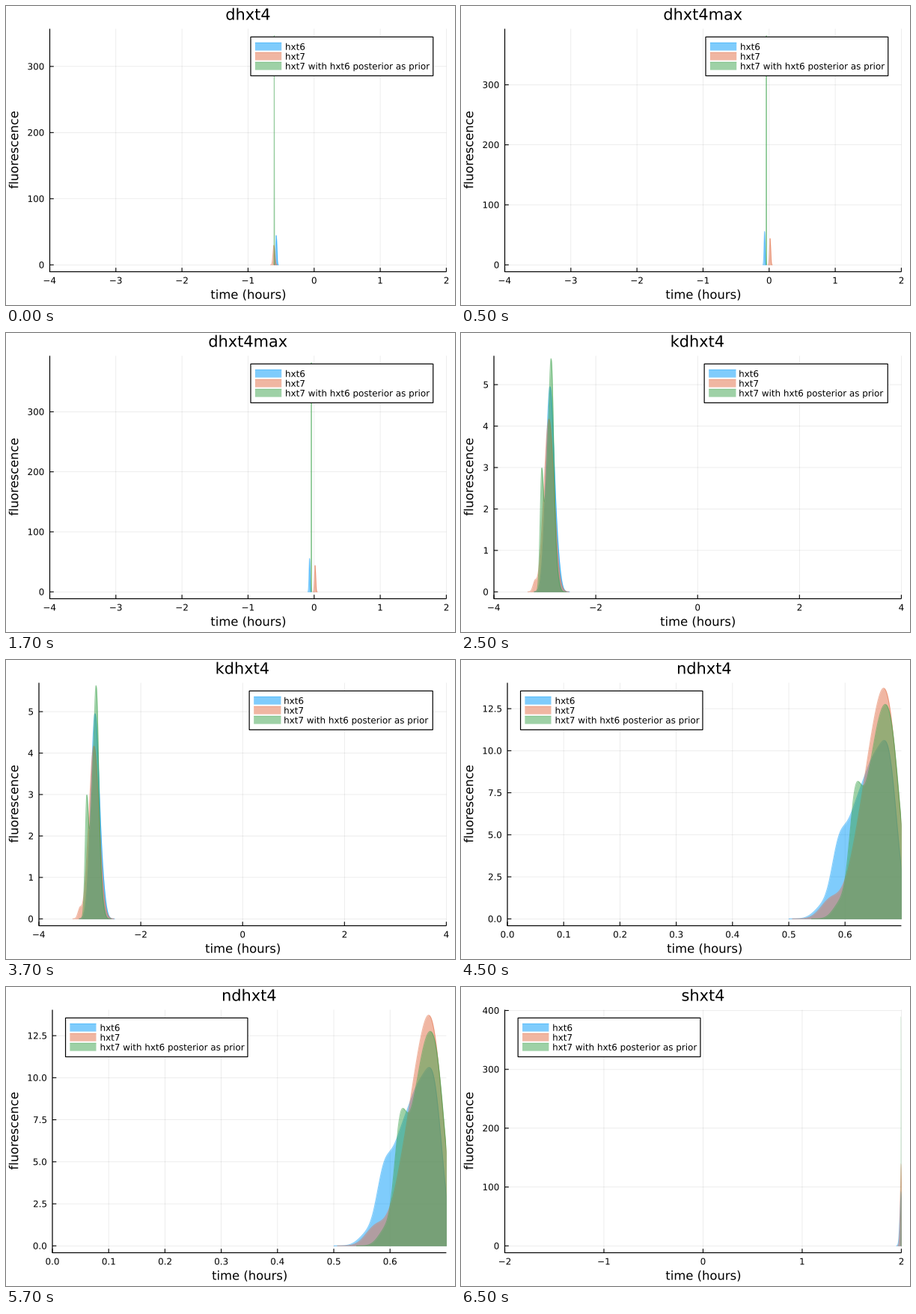
Animation of 600x400 px, one loop 8000 ms. Source, as a matplotlib script:

```python
import numpy as np
import matplotlib.pyplot as plt
from matplotlib.animation import FuncAnimation
from matplotlib.patches import PathPatch, Rectangle
from matplotlib.textpath import TextPath
from matplotlib.transforms import Affine2D

plt.rcParams["font.family"] = "DejaVu Sans"
plt.rcParams["path.snap"] = False
DPI = 100
PT = 72 / DPI  # points per pixel
TOP, BOTTOM, RIGHT = 30.5, 355.5, 588.4
MARGIN = (BOTTOM - TOP) * .03 / 1.06
BASE, PEAK = BOTTOM - MARGIN, TOP + MARGIN
TITLE, LABEL, TICK = 20.87, 16.4, 11.93
COLORS = ["#009AFA", "#E36F47", "#3EA44E"]
NAMES = ["hxt6", "hxt7", "hxt7 with hxt6 posterior as prior"]
FRAMES, INTERVAL = 16, 500

fig = plt.figure(figsize=(6, 4), dpi=DPI, facecolor="white")
ax = fig.add_axes([0, 0, 1, 1])


def spike(center, height):
    """A single bell enclosing unit area."""
    return [(center, height, 1 / (height * np.sqrt(2 * np.pi)))]


def density(bells):
    """Sum of (center, height, sigma) bells, sampled finely around each."""
    u = np.linspace(-4, 4, 161)
    xs = np.sort(np.concatenate([c + s * u for c, _, s in bells]))
    return xs, sum(h * np.exp(-((xs - c) / s) ** 2 / 2) for c, h, s in bells)


SCENES = [
    dict(title="dhxt4", left=58.5, xlim=(-4, 2), xticks=range(-4, 3),
         yticks=range(0, 301, 100), ymax=346.5, side="right",
         curves=[spike(-.573, 44.5), spike(-.609, 29.5), spike(-.604, 346.5)]),
    dict(title="dhxt4max", left=58.5, xlim=(-4, 2), xticks=range(-4, 3),
         yticks=range(0, 301, 100), ymax=381.8, side="right",
         curves=[spike(-.07, 55.5), spike(.014, 44), spike(-.043, 381.8)]),
    dict(title="kdhxt4", left=44, xlim=(-4, 4), xticks=range(-4, 5, 2),
         yticks=range(6), ymax=5.53, side="right",
         curves=[[(-2.9, 4.93, .08), (-2.75, .5, .06)],
                 [(-2.92, 4.17, .099), (-3.2, .2, .035)],
                 [(-3.065, 2.4, .03), (-2.95, 2.6, .065),
                  (-2.868, 4.25, .045), (-2.78, .5, .05)]]),
    dict(title="ndhxt4", left=62, xlim=(0, .7), xticks=np.arange(7) / 10,
         yticks=np.arange(6) * 2.5, ymax=13.63, side="left",
         curves=[[(.56, .7, .015), (.588, 3.3, .013), (.617, 5.1, .018),
                  (.652, 8, .019), (.68, 6.9, .0145)],
                 [(.574, 1.1, .017), (.622, 3.3, .02), (.65, 6.8, .019),
                  (.678, 10.5, .019)],
                 [(.592, .9, .013), (.617, 4.4, .01), (.632, 4.4, .016),
                  (.658, 7.5, .016), (.683, 9.3, .0165)]]),
    dict(title="shxt4", left=58.5, xlim=(-2, 2), xticks=range(-2, 3),
         yticks=range(0, 401, 100), ymax=389.5, side="left",
         curves=[[(2, 93, .0128)], [(2, 140, .0094)], spike(2, 389.5)]),
]


def text(x, y, string, size, align=0, angle=0, zorder=4):
    """Outline text on a baseline; align is 0 left, 0.5 center, 1 right."""
    path = TextPath((0, 0), string, size=size)
    box = path.get_extents()
    shift = -(box.x0 + align * box.width) if align else 0
    place = Affine2D().translate(shift, 0).rotate_deg(angle).scale(1, -1).translate(x, y)
    ax.add_patch(PathPatch(place.transform_path(path), fc="black", lw=0, zorder=zorder))


def line(xs, ys, color="black", px=1.1, **kw):
    return ax.plot(xs, ys, color=color, lw=px * PT, solid_capstyle="butt",
                   **{"zorder": 4, **kw})[0]


def grid(xs, ys):
    line(xs, ys, px=.7, alpha=.1, zorder=1)


def draw_axes(scene, to_x, to_y):
    left = scene["left"]
    mid = (left + RIGHT) / 2
    for value in scene["xticks"]:
        x = to_x(value)
        grid([x, x], [TOP, BOTTOM])
        line([x, x], [BOTTOM, BOTTOM - 5.3])
        text(x, 371.4, f"{value}".replace("-", "\u2212"), TICK, .5)
    for value in scene["yticks"]:
        y = to_y(value)
        grid([left, RIGHT], [y, y])
        line([left, left + 5.3], [y, y])
        text(left - 8, y + 4.35, f"{value}", TICK, 1)
    line([left, left, RIGHT], [TOP, BOTTOM, BOTTOM], px=1.2)
    text(mid, 18.5, scene["title"], TITLE, .5)
    text(mid, 391.7, "time (hours)", LABEL, .5)
    text(16.2, 192.7, "fluorescence", LABEL, .5, angle=90)


def draw_curves(scene, to_x, to_y):
    left = scene["left"]
    area = Rectangle((left, TOP), RIGHT - left, BOTTOM - TOP, transform=ax.transData)
    for bells, color in zip(scene["curves"], COLORS):
        xs, heights = density(bells)
        xs, ys = to_x(xs), to_y(heights)
        fill = ax.fill_between(xs, ys, BASE, color=color, alpha=.5, lw=0, zorder=2)
        edge = line(xs, ys, color, alpha=.5, zorder=2)
        fill.set_clip_path(area)
        edge.set_clip_path(area)


def draw_legend(left, side):
    width = RIGHT - left
    box = 192.5 + .0967 * width
    x = left + width / 30 if side == "left" else RIGHT - width / 30 - box
    ax.add_patch(Rectangle((x, 41.4), box, 52, fc="white", ec="black",
                           lw=1.2 * PT, zorder=6))
    x0, x1 = x + width / 90, x + width * 7 / 90
    for row, (color, name) in enumerate(zip(COLORS, NAMES)):
        y = 54.4 + 13 * row
        ax.add_patch(Rectangle((x0, y - 5.2), x1 - x0, 10.4, fc=color,
                               alpha=.5, lw=0, zorder=7))
        line([x0, x1], [y - 5.2, y - 5.2], color, alpha=.5, zorder=7)
        text(x + 46, y + 4.35, name, TICK, zorder=8)


def update(frame):
    scene = SCENES[(frame + 3) // 4]
    left, (lo, hi), ymax = scene["left"], scene["xlim"], scene["ymax"]

    def to_x(value):
        return left + (value - lo) / (hi - lo) * (RIGHT - left)

    def to_y(value):
        return BASE - value / ymax * (BASE - PEAK)

    ax.clear()
    ax.set(xlim=(0, 600), ylim=(400, 0))
    ax.axis("off")
    draw_axes(scene, to_x, to_y)
    draw_curves(scene, to_x, to_y)
    draw_legend(left, scene["side"])
    return []


anim = FuncAnimation(fig, update, frames=FRAMES, interval=INTERVAL,
                     init_func=lambda: [], repeat=True, repeat_delay=0)
plt.show()
```
